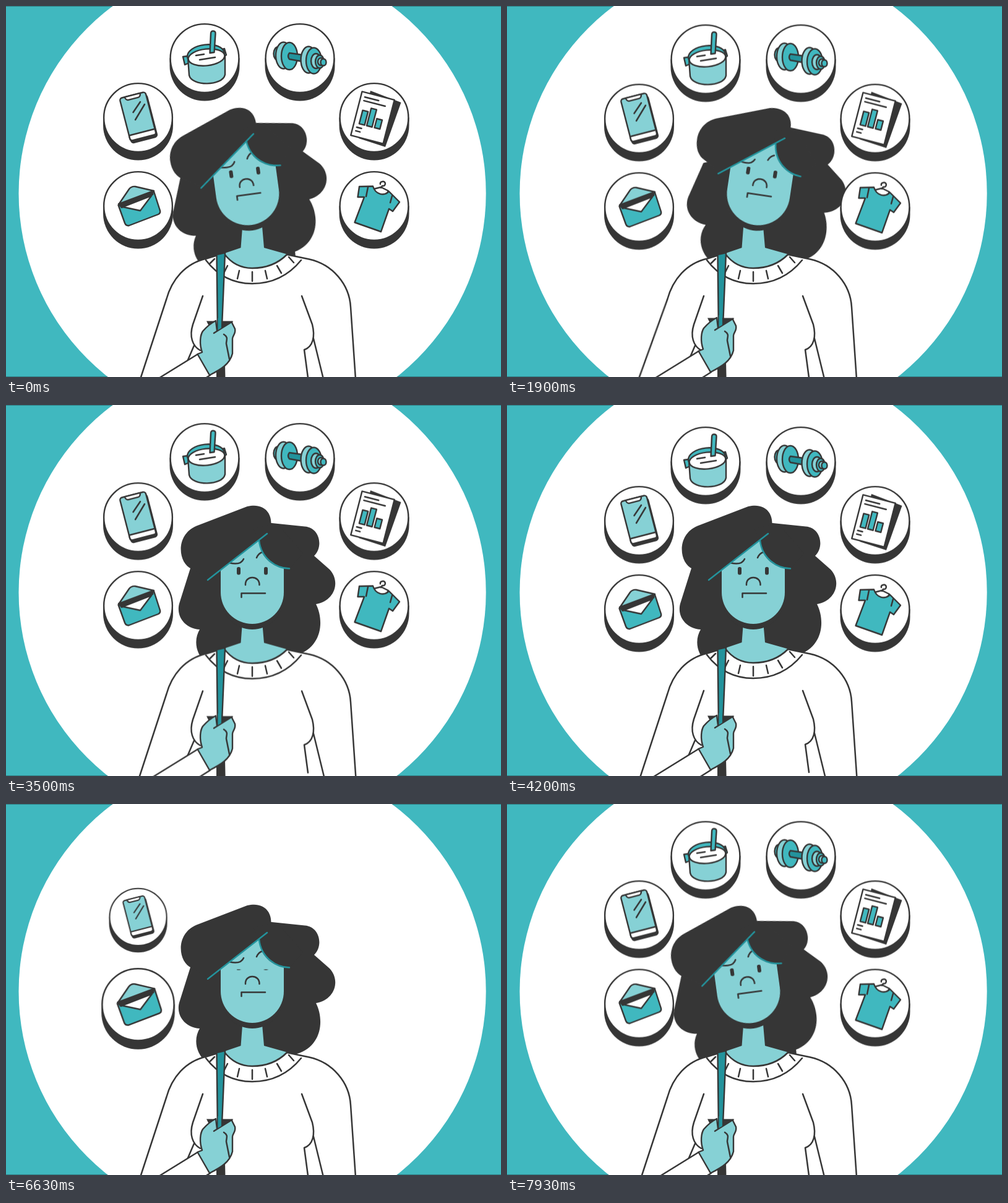
An HTML page for the animation above (8000 ms loop, 800 by 600 pixels).

```html
<!DOCTYPE html>
<html lang="en">
<head>
<meta charset="utf-8">
<title>Juggling daily life</title>
<style>
html, body { margin: 0; width: 100%; height: 100%; overflow: hidden; background: #40b8bf; }
svg { display: block; width: 800px; height: 600px; }
:root { --ink: #363636; --teal: #40b8bf; --pale: #86d1d5; --deep: #23939c; --sine: cubic-bezier(.37, 0, .63, 1); }
.line { fill: none; stroke: var(--ink); stroke-width: 2.5; stroke-linecap: round; stroke-linejoin: round; }
.shape { stroke: var(--ink); stroke-width: 2.4; stroke-linecap: round; stroke-linejoin: round; }
.ink { fill: var(--ink); }
.teal { fill: var(--teal); }
.pale { fill: var(--pale); }
.deep { fill: var(--deep); }
.white { fill: #fff; }
.band { fill: none; stroke: var(--deep); stroke-width: 2.5; stroke-linecap: round; }

.head, .float, .body, .hand, .sleeve, .eyes { animation: 8s infinite var(--sine); }
.head { animation-name: tilt; }
.back { --l: -5.5deg; --r: 6.5deg; transform-origin: 398px 430px; }
.face { --l: -7.7deg; --r: 8.5deg; transform-origin: 398px 360px; }
.front { --l: -8deg; --r: 10deg; transform-origin: 402px 365px; }
.float { animation-name: float; }
.body { animation-name: shrug; }
.hand { animation-name: tug; }
.sleeve { animation-name: swing; transform-origin: 259px 475px; }
.eyes { animation-name: blink; transform-origin: 398px 268px; }
.disc { animation: 8s infinite linear; }

@keyframes tilt {
  0%, 5%, 98%, 100% { transform: rotate(var(--l)); }
  18%, 24% { transform: rotate(var(--r)); }
  34.5%, 86.5% { transform: rotate(0deg); }
}
@keyframes float {
  0% { transform: translateY(0); animation-timing-function: cubic-bezier(.61, 1, .88, 1); }
  11.875% { transform: translateY(7px); }
  34.375% { transform: translateY(-2.8px); }
  56.875%, 70% { transform: translateY(7.8px); }
  92.5% { transform: translateY(-3px); animation-timing-function: cubic-bezier(.12, 0, .39, 0); }
  100% { transform: translateY(0); }
}
@keyframes shrug {
  0%, 34.5%, 59%, 100% { transform: translateY(0); }
  46%, 53% { transform: translateY(-7px); }
}
@keyframes tug {
  0%, 34%, 100% { transform: translateY(0); }
  17% { transform: translateY(-7.5px); }
}
@keyframes swing {
  0%, 34%, 100% { transform: rotate(0deg); }
  17% { transform: rotate(2.6deg); }
}
@keyframes blink {
  0%, 80%, 85.75%, 100% { transform: scaleY(1); }
  82.5%, 83.2% { transform: scaleY(.11); }
}
</style>
</head>
<body>
<svg viewBox="0 0 800 600">
  <rect class="teal" width="800" height="600"/>
  <path d="M0 .5H800M0 599.5H800" stroke="#2f7f84"/>
  <circle class="white" cx="398.1" cy="303" r="377.6"/>

  <g class="head back">
    <path class="ink" d="M340 250L298 264L281 318C273 340 288 361 313 363C304 378 304 402 326 420V445H470V404C510 392 515 350 501 322C532 317 541 285 523 266L498 244C514 228 506 198 483 196.500L420 190Z"/>
  </g>

  <g class="body">
    <path class="pale" d="M383 345L379.500 391L350 401Q366 426 398 426Q432 426 456 402L417 391L413 345Z"/>
    <path class="white" d="M352 400L324 408.500C290 416 268 442 259 475L205 640H568L557 487C555 450 528 418 490 409.500L454 402Q434 424 398 424Q370 424 352 400Z"/>
    <path class="line" d="M259 475C268 442 290 416 324 408.500L352 400Q370 424 398 424Q432 424 454 402L490 409.500C528 418 555 450 557 487L567.500 640"/>
    <path class="line sleeve" d="M259 475L205 640"/>
    <path class="line" d="M323 411Q352 449 398 449Q446 449 477 411M330 416L337 409M352 432L358 420M374 441L377 428M398 445V430M422 441L419 428M445 432L438 420M465 415L457 406"/>
    <path class="line" d="M318 469L302 515C296 534 301 550 314 557M304 549L292 577M478 469L495 515C500 535 496 551 482 556L488 601M497 538L522 640"/>
    <path class="shape deep" d="M340.500 402L354 399L348.500 530H342Z"/>
    <g class="hand">
      <path class="ink" d="M324 509.500H340V522H348V509.500H367L362 526H332ZM340 580H354L355 625H340Z"/>
      <path class="white" d="M310 563L200 634L270 645L330 597Z"/>
      <path class="line" d="M310 563L200 631M330 597L262 640"/>
      <path class="shape pale" d="M317 560C312 546 314 532 318 526C325 518 333 512 339 509L341 525L364.500 511L370 522C372 530 366 533 366 538V562C362 579 347 588 329 597L309.500 563Z"/>
      <path class="line" d="M336 529L364.500 511M352 531C360 536 356 540 356 546L361 571"/>
      <path class="deep" d="M342.500 505H348L347.800 521L342.500 524Z"/>
    </g>
  </g>

  <g class="head face">
    <path class="ink" d="M347 312V270H449V312A51 51 0 0 1 347 312Z"/>
    <path class="pale" d="M347 303V255L408 212H449V303A51 51 0 0 1 347 303Z"/>
    <g class="eyes ink">
      <rect x="373" y="262" width="6" height="12.500" rx="2.800"/>
      <rect x="417" y="262" width="6" height="12.500" rx="2.800"/>
    </g>
    <path class="line" d="M387 291C386 275 410 275 409.500 291M419 304.500H380.500V311M362 255.500C373 258 381 256 384 249M405 247Q408 240 414 238"/>
  </g>
  <g class="head front">
    <path class="ink" d="M422 208C436 193 428 155 390 164L308 195.500C273 210 278 256 300 265L328 281Z"/>
    <path class="ink" d="M400 200L409 219C411 250 436 265 458 265L480 240L440 194L424 194Z"/>
    <path class="band" d="M326 283L422 208M409 219C412 248 436 264 458 264.500"/>
  </g>

  <g class="float">
    <g class="disc" data-x="213.5" data-y="323.5">
      <path class="shape pale" d="M182 321L199 296Q203 291 209 292L239 299Z"/>
      <path class="shape teal" d="M181.500 322L239 300L249 331Q250 335 246 337L199 355Q194 356 192 351Z"/>
      <path class="shape ink" d="M182 320L238 299L237 305L187 326Z"/>
      <path class="shape white" d="M189 325L235 307L217 331Z"/>
    </g>
    <g class="disc" data-x="213.5" data-y="180.5">
      <g transform="translate(213 178) rotate(-14.5)">
        <rect class="shape ink" x="-20.500" y="-30" width="43" height="70" rx="4"/>
        <rect class="shape pale" x="-21.500" y="-35" width="43" height="71" rx="4"/>
        <path class="shape white" d="M-13 -35Q-12 -29 -8 -29H8Q12 -29 13 -35ZM-21.500 27H21.500V32Q21.500 36 17.500 36H-17.500Q-21.500 36 -21.500 32Z"/>
      </g>
      <path class="line" d="M205.500 172L217 155M209 184L224 159"/>
    </g>
    <g class="disc" data-x="321" data-y="84.5">
      <path class="shape teal" d="M286 82L293 81L296 92L289 95ZM347 71L353 69L356 79L351 83Z"/>
      <path class="shape pale" d="M294 84L296 112C300 130 350 130 354 111V80Z"/>
      <ellipse class="shape teal" cx="323" cy="79" rx="30" ry="16.500" transform="rotate(-6 323 79)"/>
      <ellipse class="shape white" cx="324" cy="83" rx="29.500" ry="13.500" transform="rotate(-6 324 83)"/>
      <path class="line" d="M307 80L320 78M313 87L338 83"/>
      <path class="shape teal" d="M329.500 76L331 44Q331.500 40 335 40.500Q339 41 338.500 45L336.500 75Z"/>
    </g>
    <g class="disc" data-x="475" data-y="84.5">
      <g class="shape">
        <ellipse class="teal" cx="440" cy="77" rx="7.500" ry="11"/>
        <ellipse class="pale" cx="448.500" cy="80" rx="12.500" ry="21.500"/>
        <ellipse class="teal" cx="458" cy="81" rx="13" ry="22"/>
        <path class="deep" d="M458 76L486 80V91L458 86Q454 81 458 76Z"/>
        <ellipse class="pale" cx="489" cy="87" rx="12.500" ry="21.500"/>
        <ellipse class="teal" cx="497.500" cy="88.500" rx="12.500" ry="21"/>
        <ellipse class="pale" cx="501" cy="89" rx="8" ry="12"/>
        <ellipse class="teal" cx="507" cy="90" rx="7" ry="10.500"/>
        <ellipse class="pale" cx="509" cy="90" rx="5" ry="6"/>
        <ellipse class="teal" cx="513" cy="91" rx="4.500" ry="5.500"/>
      </g>
    </g>
    <g class="disc" data-x="595" data-y="180.5">
      <path class="ink" d="M589 137L638.500 156L613 228L570 214Z"/>
      <g transform="translate(592.5 180.5) rotate(14.5)">
        <rect class="shape white" x="-27" y="-36.500" width="54" height="73"/>
        <path class="line" d="M-20.500 -29H2.500M-20.500 -23H15M-21 21.500H-13M-21 27.500H-14"/>
        <path class="shape teal" d="M-18.500 15V-7.500H-9.500V15ZM-6 15V-14H3V15ZM7 15V0H16V15Z"/>
      </g>
    </g>
    <g class="disc" data-x="595" data-y="323.5">
      <path class="shape white" d="M594 296L606 293L618 299C614 308 598 307 594 296Z"/>
      <path class="shape teal" d="M571 292L593 291.500C597 305 611 308 619 300L636 317L625 332L619 328L606 365L563.500 350L579 309L568.500 309Z"/>
      <path class="line" d="M585 293L582 308M624 307L621 318M606 294L608 291C615 292 614 282 608 284Q604 285 605 288"/>
    </g>
  </g>
</svg>
<script>
const discs = [...document.querySelectorAll('.disc')];
const easeIn = 'cubic-bezier(.333,0,.667,0)', easeBoth = 'cubic-bezier(.37,0,.63,1)';
const step = (ms, size, ease = 'linear') =>
  `${(ms / 80).toFixed(3)}%{transform:scale(${size});animation-timing-function:${ease}}`;

let rules = '';
discs.forEach((disc, i) => {
  const x = +disc.dataset.x, y = +disc.dataset.y;
  disc.insertAdjacentHTML('afterbegin',
    `<path class="ink" d="M${x - 56.5} ${y}v12.500a56.500 56.500 0 0 0 113 0v-12.500z"/>
     <circle class="shape white" cx="${x}" cy="${y}" r="55.400"/>`);

  // Shrink away from last to first, pop back from first to last.
  const out = 4368 + 88 * (5 - i), back = 6215 + 215 * i;
  rules += `@keyframes pop${i}{` + step(0, 1) +
    step(out, 1, easeIn) + step(out + 605, 0) +
    step(back, 0, easeBoth) + step(back + 300, 1.1, easeBoth) +
    step(back + 530, 1) + step(8000, 1) + '}';
  disc.style.transformOrigin = `${x}px ${y + 6}px`;
  disc.style.animationName = 'pop' + i;
});
const sheet = document.createElement('style');
sheet.textContent = rules;
document.head.append(sheet);
</script>
</body>
</html>
```
